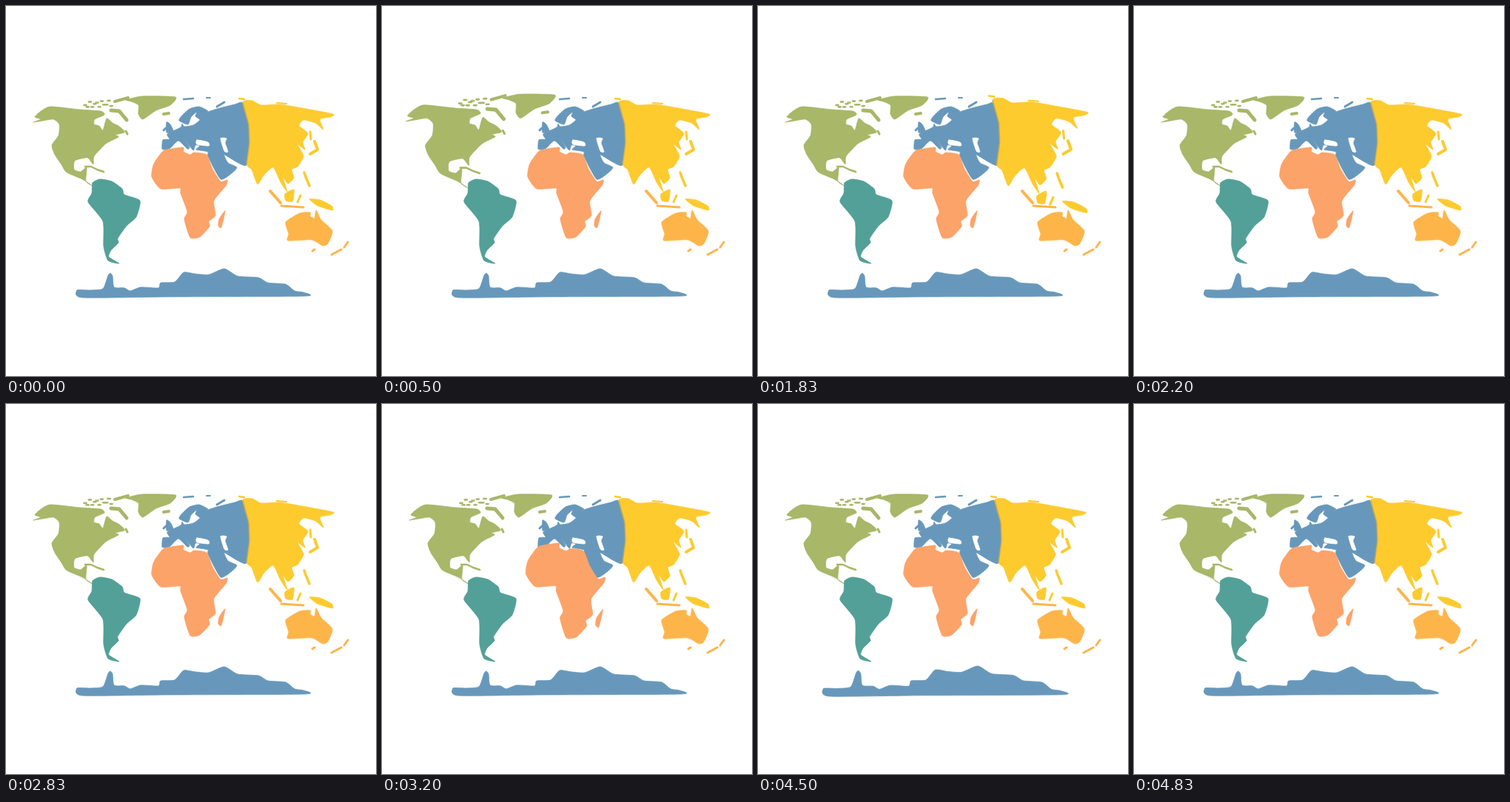
Recreate the animation shown at these times as an HTML page. Size 500 px wide and 500 px high, loop 5.51 s.

```html
<!DOCTYPE html>
<html lang="en">
<head>
<meta charset="utf-8">
<title>Seven continents</title>
<style>
html, body { margin: 0; width: 100%; height: 100%; overflow: hidden; background: #fff; }
svg { display: block; width: 100%; height: 100%; }
g { transform-box: fill-box; transform-origin: center; stroke-linejoin: round; stroke-linecap: round; }
</style>
</head>
<body>
<svg viewBox="0 0 500 500"></svg>
<script>
const LOOP = 5510;
const PEAK = 1.047;
const BLUE = '#6798bb';
const svg = document.querySelector('svg');
const lands = [];

function add(parent, tag, attrs) {
  const el = document.createElementNS('http://www.w3.org/2000/svg', tag);
  for (const name in attrs) el.setAttribute(name, attrs[name]);
  return parent.appendChild(el);
}

// Soft closed curve through a few coast points.
function coast(text) {
  const pts = text.split(' ').map(p => p.split(',').map(Number));
  const at = i => pts[(i + pts.length) % pts.length];
  const handle = (i, k) => at(i).map((v, axis) => v + k * (at(i + 1)[axis] - at(i - 1)[axis]));
  const curves = pts.map((_, i) => `C${handle(i, .1)} ${handle(i + 1, -.1)} ${at(i + 1)}`);
  return `M${pts[0]}${curves.join('')}Z`;
}

// A continent that swells between the on and off times.
function continent(color, on, off) {
  const g = add(svg, 'g', { fill: color, stroke: color });
  lands.push({ g, on, off });
  return {
    g,
    shape(text, fill = color) {
      add(g, 'path', { d: coast(text), fill, stroke: fill, 'stroke-width': .8 });
      return this;
    },
    strip(width, points, stroke = color) {
      add(g, 'polyline', { points, fill: 'none', stroke, 'stroke-width': width });
      return this;
    }
  };
}

// Antarctica
continent(BLUE, 4500, 4830)
  .shape('96,384 113,384 131,382 138,364 141,361 144,365 146,380 160,381 168,385 182,380 206,381 209,374 228,373 240,360 256,362 274,363 295,355 313,365 341,367 354,374 378,376 390,385 402,387 404,392 220,393 103,394');

// North America
const north = continent('#a8b768', 500, 830)
  .shape('37,157 47,153 39,150 46,143 60,136 100,140 128,142 133,147 120,153 119,160 126,162 131,168 136,152 144,158 152,162 158,167 160,171 148,174 152,177 135,186 119,203 118,214 110,205 93,209 92,221 101,224 109,218 108,237 117,243 103,234 81,224 71,206 75,214 66,201 62,188 71,175 72,160 64,153 50,155')
  .shape('162,127 184,122 229,123 222,134 203,141 185,153 179,146 179,134 169,129')
  .strip(5, '142,141 153,142 163,154')
  .strip(4, '147,129 165,124')
  .strip(3, '162,169 164,173')
  .strip(4, '213,146 220,145')
  .strip(2.5, '107,217 115,217 123,221 132,224');
for (let i = 0; i < 12; i++) {
  add(north.g, 'ellipse', {
    cx: 107 + i * 3.2, cy: 134 - i / 4 + 4 * Math.sin(i * 2.4), rx: 3, ry: 1.4, stroke: 'none'
  });
}

// South America
continent('#52a097', 3830, 4200)
  .shape('117,239 127,234 143,237 157,247 160,255 181,263 176,285 163,297 151,314 152,320 142,330 139,339 153,348 138,344 132,325 131,291 111,265 116,253');

// Europe
continent(BLUE, 1200, 1500)
  .shape('211,193 212,181 221,180 218,173 236,164 238,159 241,163 253,161 262,154 256,149 258,143 250,150 246,160 234,155 237,149 248,139 261,136 273,142 267,145 285,139 309,133 320,131 328,160 329,185 325,215 312,211 295,201 300,212 312,218 305,226 290,234 273,203 273,197 257,194 262,189 256,188 253,195 242,181 248,191 245,193 233,182 222,192 216,194')
  .shape('217,157 222,160 226,169 217,171')
  .strip(3, '213,168 216,165')
  .strip(2.5, '240,126 253,125')
  .strip(2, '271,124 276,124')
  .strip(3, '285,136 295,130')
  .shape('258,181 273,184 274,189 258,187', '#fff')
  .shape('290,179 298,179 296,185 300,197 295,196', '#fff');

// Africa
continent('#fca369', 3200, 3500)
  .shape('214,195 239,191 240,197 249,201 254,198 271,201 279,220 290,237 299,235 297,243 281,263 283,283 274,291 275,298 262,312 249,313 241,288 245,278 236,253 235,246 209,247 197,231 199,215 205,205')
  .shape('296,277 291,299 287,297 288,288');

// Asia
continent('#fdcb2e', 1830, 2200)
  .shape('320,130 333,128 345,134 370,133 400,138 442,146 438,150 424,153 429,167 418,158 402,154 396,162 408,172 401,184 404,194 394,187 402,203 394,217 386,221 389,232 381,240 374,231 380,251 371,238 361,218 348,229 340,241 332,221 326,215 329,185 328,160')
  .shape('377,254 389,248 387,264 378,263')
  .shape('410,261 424,262 440,270 441,276 421,270')
  .strip(2.5, '315,125 322,126')
  .strip(2, '366,131 379,132')
  .strip(3, '411,170 412,180')
  .strip(4, '417,183 421,194 411,200')
  .strip(3.5, '403,225 405,231 410,243')
  .strip(3, '398,256 394,265')
  .strip(1.5, '320,131 328,160 329,185 325,214', '#c9a957');

// Oceania
continent('#fdb54a', 2500, 2830)
  .shape('378,292 397,280 411,279 411,284 417,287 419,276 426,289 441,304 435,321 428,324 413,316 381,317 382,308')
  .strip(4, '357,250 371,266')
  .strip(3, '372,270 402,272')
  .strip(3, '414,331 417,329')
  .strip(3, '462,319 457,326')
  .strip(3, '453,329 440,336');

function render(t) {
  for (const { g, on, off } of lands) {
    g.style.transform = `scale(${t >= on && t < off ? PEAK : 1})`;
  }
}

const start = performance.now();
function tick() {
  render((performance.now() - start) % LOOP);
  requestAnimationFrame(tick);
}
tick();
</script>
</body>
</html>
```
